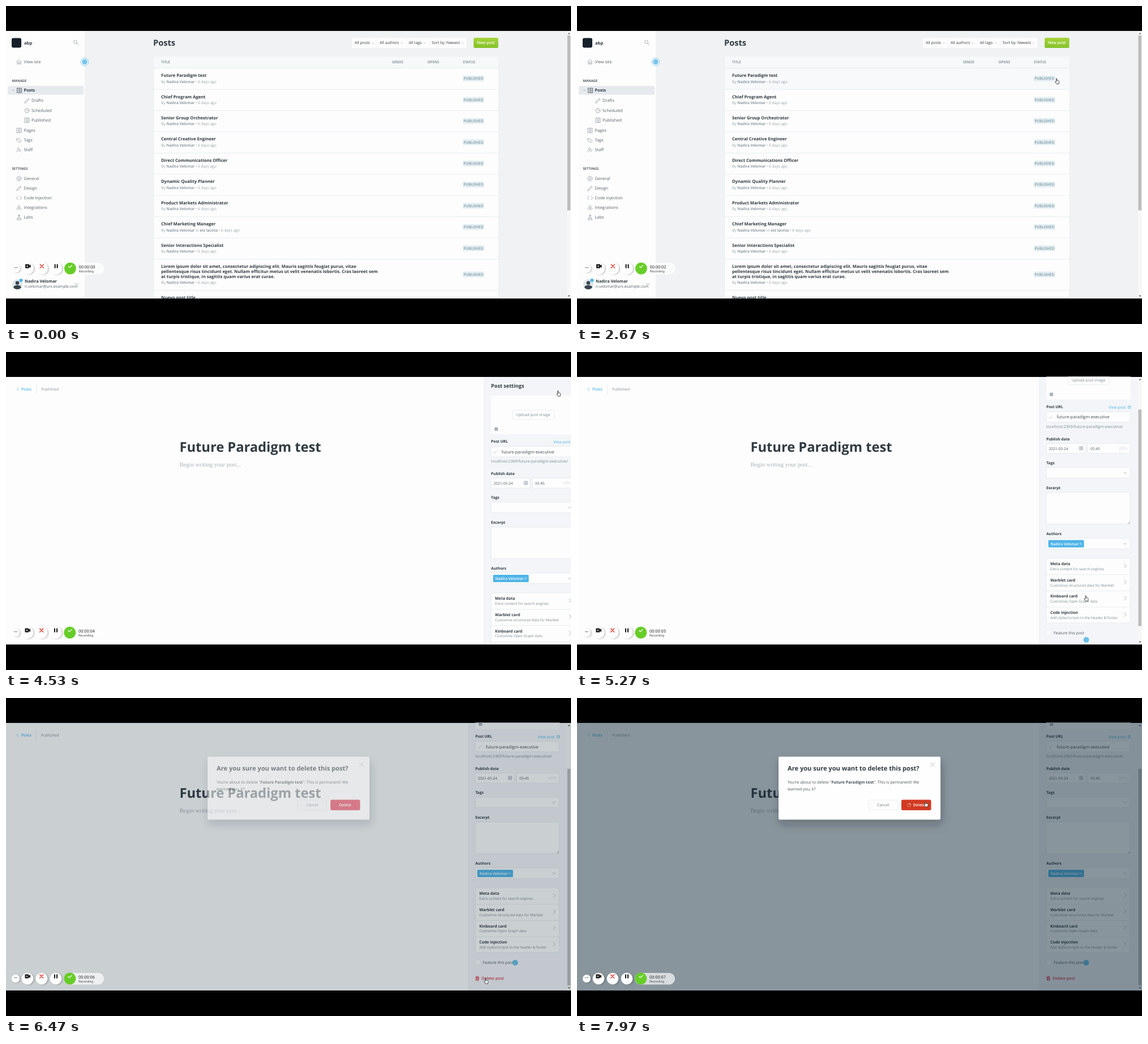
An HTML page that plays this animation: 998x561 px, repeating every 8 s.

```html
<!DOCTYPE html>
<html lang="en">
<head>
<meta charset="utf-8">
<title>Deleting a post</title>
<style>
  html, body { margin: 0; width: 100%; height: 100%; overflow: hidden; background: #000; }
  svg { display: block; width: 100vw; height: 100vh; font-family: "Open Sans", "Noto Sans", sans-serif; text-rendering: geometricPrecision; }
  text { white-space: pre; }
</style>
</head>
<body>
<svg id="stage" viewBox="0 0 998 561"></svg>
<script>
const LOOP = 8000;
const INK = '#303b42', TEXT = '#56636c', MUTED = '#94a2ab', LINE = '#dfe7ea', BLUE = '#4fb4e8';
const AUTHOR = 'Nadira Velomar', EMAIL = 'n.velomar@uni.example.com';

// ---------- drawing helpers: y is the vertical middle of a line of text ----------
const text = (x, y, str, size, fill = TEXT, weight = 400, more = '') =>
  `<text x="${x}" y="${y + size * .35}" font-size="${size}" fill="${fill}" font-weight="${weight}" ${more}>${str}</text>`;
const rect = (x, y, w, h, fill, more = '') =>
  `<rect x="${x}" y="${y}" width="${w}" height="${h}" fill="${fill}" ${more}/>`;
const box = (x, y, w, h, r = 2, fill = '#fdfdfd', stroke = LINE) =>
  rect(x, y, w, h, fill, `rx="${r}" stroke="${stroke}" stroke-width=".7"`);
const circle = (x, y, r, fill, more = '') => `<circle cx="${x}" cy="${y}" r="${r}" fill="${fill}" ${more}/>`;
const icon = (x, y, d, stroke = '#87949d', width = .75) =>
  `<path transform="translate(${x} ${y})" d="${d}" fill="none" stroke="${stroke}" stroke-width="${width}" stroke-linecap="round" stroke-linejoin="round"/>`;
const group = (id, body, more = '') => `<g id="${id}" ${more}>${body}</g>`;

const DOWN = 'M-2-1 0 1 2-1', RIGHT = 'M-1.7-3.5 1.7 0-1.7 3.5', CROSS = 'M-3-3 3 3M3-3-3 3';
const ROUND = 'M4 0A4 4 0 1 1-4 0A4 4 0 1 1 4 0';
const PAGE = 'M-3.5-4H4V4H-3.5ZM-1.5-2H2M-1.5 0H2M-1.5 2H2';

const scrollbar = thumb =>
  rect(991, 44, 7, 472, '#f7f7f7') + thumb +
  `<path d="M992.5 49.5 994.5 47 996.5 49.5ZM992.5 510.5 994.5 513 996.5 510.5Z" fill="#555"/>`;

// ---------- post list ----------
function sidebar() {
  const entries = [
    [98, 'View site', 'M-4 0 0-4 4 0M-3-1V4H-1V1H1V4H3V-1'],
    [219, 'Pages', PAGE],
    [236.5, 'Tags', 'M-4-3H0L4 1 1 4-4 0ZM-2-1.2V-1'],
    [253.5, 'Staff', 'M-1-4A1.8 1.8 0 1 1-1.1-4M-4 4C-4-1 2-1 2 3M1.5 2 4-1'],
    [304, 'General', ROUND + 'M1.5 0A1.5 1.5 0 1 1-1.5 0A1.5 1.5 0 1 1 1.5 0'],
    [321, 'Design', 'M-4 4-3 1 3-4 4-3-1 3Z'],
    [338, 'Code injection', 'M-2-3-4.5 0-2 3M2-3 4.5 0 2 3'],
    [355, 'Integrations', 'M0-4 2-2 0 0-2-2ZM-2 0 0 2-2 4-4 2ZM2 0 4 2 2 4 0 2Z'],
    [372.5, 'Labs', 'M-1.5-4H1.5M-1-4V-1L-4 4H4L1-1V-4M-2 1.5H2'],
  ];
  const nested = [
    [166.5, 'Drafts', 'M-4 4-3 1 3-4 4-3-1 3Z'],
    [184, 'Scheduled', ROUND + 'M0-2V0H2'],
    [201, 'Published', PAGE],
  ];
  return rect(0, 44, 139, 472, '#fdfdfd') +
    rect(10, 56.5, 17, 17, '#15212a', 'rx="3"') + text(32, 65, 'abp', 7.6, INK, 700) +
    icon(123, 64, 'M2.5-.5A3 3 0 1 1-3.5-.5A3 3 0 1 1 2.5-.5M1.8 1.8 4.5 4.5') +
    text(10.5, 131.5, 'MANAGE', 6, INK, 600) + text(10.5, 287, 'SETTINGS', 6, INK, 600) +
    rect(3, 141, 134, 15.5, '#e6eaee', 'rx="2"') + icon(13, 149, DOWN, MUTED) +
    icon(23.5, 149, PAGE, INK) + text(31.5, 148.5, 'Posts', 7.4, INK, 700) +
    entries.map(([y, label, d]) => icon(23, y + .5, d) + text(31.5, y, label, 7.4)).join('') +
    nested.map(([y, label, d]) => icon(37, y + .5, d) + text(45, y, label, 7.4)).join('') +
    circle(20, 491, 9, '#dfe5e9') + circle(20, 488.5, 3.2, '#35434c') +
    `<path d="M13 496.500C14 491 26 491 27 496.500A9 9 0 0 1 13 496.500Z" fill="#35434c"/>` +
    circle(26.500, 484, 3, BLUE) +
    text(33, 485, AUTHOR, 7.25, INK, 700) + text(33, 495, EMAIL, 6.9) + icon(125, 490.5, 'M-3-1.500 0 1.500 3-1.500');
}

function postList() {
  const titles = ['Future Paradigm test', 'Chief Program Agent', 'Senior Group Orchestrator',
    'Central Creative Engineer', 'Direct Communications Officer', 'Dynamic Quality Planner',
    'Product Markets Administrator', 'Chief Marketing Manager', 'Senior Interactions Specialist'];
  const lorem = ['Lorem ipsum dolor sit amet, consectetur adipiscing elit. Mauris sagittis feugiat purus, vitae',
    'pellentesque risus tincidunt eget. Nullam efficitur metus ut velit venenatis lobortis. Cras laoreet sem',
    'at turpis tristique, in sagittis quam varius erat curae.'];
  const filters = [[616, 'All posts', 648], [660, 'All authors', 699], [711.5, 'All tags', 740], [752, 'Sort by: Newest', 806.5]];
  const strong = s => `<tspan font-weight="600" fill="#768690">${s}</tspan>`;
  const byline = (y, tag = '') =>
    text(274, y, `By ${strong(AUTHOR)}${tag && ' in ' + strong(tag)} • 6 days ago`, 6.6, MUTED);
  const badge = y => rect(807, y - 5, 37.5, 10, '#e3eef2', 'rx="1.5"') +
    text(825.7, y, 'PUBLISHED', 6.4, '#7f96a2', 600, 'text-anchor="middle"');
  const divider = y => rect(261, y, 609, .8, '#dfecec');
  const title = (y, str) => text(274, y, str, 7.6, INK, 700);

  return rect(139, 44, 852, 472, '#f0f2f4') + sidebar() +
    text(260, 65, 'Posts', 14.6, INK, 700) +
    rect(611, 56.5, 202, 17.5, '#fdfdfd', 'rx="2"') +
    [655.5, 707, 747.5].map(x => rect(x, 57, .7, 17, '#eceff1')).join('') +
    filters.map(([x, label, arrow]) => text(x, 65, label, 6.85, INK) + icon(arrow, 65.5, 'M-1.500-.7 0 .7 1.500-.7', MUTED, .6)).join('') +
    rect(826, 56, 43.5, 18, 'url(#green)', 'rx="2.5"') +
    text(847.7, 65, 'New post', 6.9, '#fff', 600, 'text-anchor="middle"') +
    rect(261, 89, 609, 427, '#fdfdfd', 'stroke="#e8edef" stroke-width=".7"') + rect(261, 89, 609, 20.5, '#f6f8f9') +
    [[274, 'TITLE'], [682, 'SENDS'], [744.5, 'OPENS'], [807, 'STATUS']].map(([x, s]) => text(x, 99, s, 6.2, '#71808a', 600)).join('') +
    rect(261, 109.5, 609, 37.4, '#f7f9fb', 'id="hover"') + divider(109) +
    titles.map((name, i) => {
      const y = 37.42 * i;
      return title(122.5 + y, name) + byline(133.3 + y, i === 7 ? 'est lacinia' : '') + badge(128 + y) + divider(146.7 + y);
    }).join('') +
    lorem.map((line, i) => title(459.3 + i * 8.9, line)).join('') + byline(487.7) + badge(473.5) + divider(501) +
    title(514.5, 'Nuevo post title') +
    circle(139, 98.5, 6.8, '#fdfdfd', 'stroke="#84c9ec" stroke-width="1"') + circle(139, 98.5, 4.8, '#7ac6eb') +
    scrollbar(rect(991.5, 52, 5.5, 308.5, '#bcbcbc'));
}

// ---------- editor ----------
function settings() {
  const label = (y, s) => text(829, y, s, 6.7, INK, 700);
  const cards = [['Meta data', 'Extra content for search engines'], ['Warblet card', 'Customise structured data for Warblet'],
    ['Kinboard card', 'Customise Open Graph data'], ['Code injection', 'Add styles/scripts to the header &amp; footer']];
  const calendar = 'M-3-3H3V3H-3ZM-3-1H3M-3 1H3M-1-3V3M1-3V3';
  return text(829, 60, 'Post settings', 9.1, INK, 700) +
    rect(829, 77, 149, 68, '#fdfdfd', 'rx="2"') + box(867, 102.5, 73, 16.5) +
    text(903.5, 111, 'Upload post image', 6.8, '#7d8b94', 400, 'text-anchor="middle"') +
    rect(835, 133, 6, 6, '#a9b3b9') +
    label(158, 'Post URL') + text(939, 158.5, 'View post', 6.8, BLUE) + icon(975.5, 158.5, 'M0-2H-2V2H2V0M0 0 2-2M.5-2H2V-.5', BLUE) +
    box(829, 166.5, 148, 18.5) + icon(837.5, 176, 'M-2.5 2 2.500-2M-2.5 0V2H-.5', '#c6cfd4') +
    text(847.5, 176, 'future-paradigm-executive', 7.55, '#3f4c54') +
    text(829, 193, 'localhost:2369/future-paradigm-executive/', 6.85, '#7c8a92') +
    label(215, 'Publish date') + box(829, 222.5, 69, 17.5) + box(902, 222.5, 75, 17.5) +
    text(833.5, 231.5, '2021-05-24', 6.5, '#4c5961') + icon(890.5, 231, calendar, MUTED, .6) +
    text(907, 231.5, '05:45', 6.5, '#4c5961') + text(957.500, 231.5, '(UTC)', 5.6, '#c3ccd1') +
    label(257, 'Tags') + box(829, 265, 148, 18.5) + icon(968, 274.5, 'M-2.500-1.2 0 1.2 2.500-1.2', MUTED) +
    label(301, 'Excerpt') + box(829, 309, 148, 55.5) + icon(975, 362.5, 'M-2 1.500 1.500-2M0 1.500 1.500 0', '#777', .6) +
    label(382, 'Authors') + box(829, 390, 148, 18.5) + rect(832.5, 393, 63, 13, BLUE, 'rx="1.500"') +
    text(836.5, 399.5, AUTHOR, 6.6, '#fff', 600) + icon(889.7, 399.5, 'M-1.700-1.700 1.700 1.700M1.700-1.700-1.700 1.700', '#dff1fb') +
    icon(968, 399.5, 'M-2.500-1.2 0 1.2 2.500-1.2', MUTED) +
    box(829, 425, 148, 114) +
    cards.map(([name, about], i) => {
      const y = 28.6 * i;
      return (i ? rect(829, 425 + y, 148, .7, LINE) : '') + text(836, 435 + y, name, 6.9, INK, 700) +
        text(836, 444 + y, about, 6.3, '#7c8a92') + icon(968.5, 438.5 + y, RIGHT, MUTED);
    }).join('') +
    box(829, 552, 9, 9) + text(842, 557, 'Feature this post', 6.9, '#4c5961') +
    icon(832.5, 584.5, 'M-3-2H3M-1-3.300H1M-2.300-2V3.500H2.300V-2M-.8-.5V2M.8-.5V2', '#d8364b', 1) +
    text(840, 584.5, 'Delete post', 7.2, '#d8364b', 600);
}

function editor() {
  return rect(0, 44, 998, 472, '#fdfdfd') +
    icon(20.500, 65.5, 'M1.200-2.500-1.200 0 1.200 2.500', BLUE) + text(27, 65.5, 'Posts', 6.9, BLUE, 600) +
    rect(53, 56, .7, 20, LINE) + text(62, 65.5, 'Published', 6.75, '#84929b') +
    text(306.5, 167.5, 'Future Paradigm test', 23.7, INK, 700) +
    text(306.5, 198.5, 'Begin writing your post...', 10.6, '#a7b2b9', 400, 'font-family="Liberation Serif, serif"') +
    group('panel', rect(817, 44, 181, 472, '#f3f5f8') + rect(816.5, 44, .7, 472, '#e6ebee') +
      group('settings', settings()) + circle(899.5, 0, 5, '#6cc0e8', 'id="dot"') +
      scrollbar(rect(991.5, 52, 5.5, 382, '#bcbcbc', 'id="thumb"')));
}

function modal() {
  return rect(356, 103.5, 286, 111, '#fefefe', 'rx="2.500" filter="url(#shadow)"') +
    text(372, 124.5, 'Are you sure you want to delete this post?', 11.1, INK, 700) +
    icon(628, 117.5, 'M-4-4 4 4M4-4-4 4', '#9fabb2', .7) +
    text(372, 149, 'You\'re about to delete "<tspan font-weight="700">Future Paradigm test</tspan>". This is permanent! We', 7.1, '#48555d') +
    text(372, 161, 'warned you, k?', 7.1, '#48555d') +
    box(515, 180, 51.5, 18, 2.5) + text(540.7, 189, 'Cancel', 6.8, '#6d7b84', 400, 'text-anchor="middle"') +
    rect(573, 179.500, 52.5, 18.5, '#e0314a', 'rx="2.500" id="delete"') +
    text(599, 189, 'Delete', 6.8, '#fff', 600, 'text-anchor="middle" id="deleteLabel"') +
    group('spinner', circle(0, 0, 2.8, 'none', 'stroke="#fff" stroke-opacity=".45" stroke-width=".8"') +
      `<path d="M0-2.8A2.8 2.8 0 0 1 2.800 0" fill="none" stroke="#fff" stroke-width=".8"/>`);
}

// ---------- recorder and pointer ----------
function recorder() {
  return rect(102, 485, 71, 20.500, '#fff', 'rx="10" fill-opacity=".68"') +
    [[17, 7], [38, 10.3], [63, 10.3], [88, 10.3]].map(([x, r]) => circle(x, 495, r, '#fff', 'filter="url(#soft)"')).join('') +
    circle(112.800, 495, 10.5, '#67cd28') +
    [14.8, 17, 19.2].map(x => circle(x, 493.500, .75, '#44505a')).join('') +
    `<path d="M33.500 487.500H40.300V490L43 488V494L40.300 492V494.500H33.500Z" fill="#111"/><path d="M35.200 491H38.700M37 489.300V492.700" stroke="#fff" stroke-width=".8"/>` +
    icon(62.700, 491, CROSS, '#e02b20', 1.4) + rect(85, 487.500, 2, 7, '#111') + rect(89, 487.500, 2, 7, '#111') +
    icon(112.800, 491.500, 'M-3 0-1 2 3.300-2', '#fff', 1.1) +
    text(128, 492, '', 7.5, '#333', 400, 'id="clock" font-family="Roboto, sans-serif"') +
    text(128, 499.800, 'Recording', 5.8, '#555', 400, 'font-family="Roboto, sans-serif"');
}

const HAND = 'M-1.500-4.500C-1.500-5.500-.2-5.500-.2-4.500V-1.500L2.800-.9C3.600-.7 3.700 0 3.600.8L3 4.500H-1L-3.300 1C-3.600.2-2.500-.3-1.500.8Z';

document.getElementById('stage').innerHTML = `
  <defs>
    <linearGradient id="green" x2="0" y2="1"><stop stop-color="#a5d43a"/><stop offset="1" stop-color="#85c22a"/></linearGradient>
    <filter id="shadow" x="-20%" y="-20%" width="140%" height="170%"><feDropShadow dy="8" stdDeviation="8" flood-color="#14242e" flood-opacity=".3"/></filter>
    <filter id="soft" x="-30%" y="-30%" width="160%" height="170%"><feDropShadow dy=".8" stdDeviation="1" flood-opacity=".22"/></filter>
    <clipPath id="screen"><rect y="43.500" width="998" height="472.500"/></clipPath>
  </defs>
  ${rect(0, 0, 998, 561, '#000')}
  <g clip-path="url(#screen)">
    ${group('list', postList())}
    ${group('editor', editor())}
    ${rect(0, 43, 998, 473, '#122a38', 'id="shade"')}
    ${group('modal', modal())}
    ${group('recorder', recorder())}
    ${group('pointer', `<path d="${HAND}" fill="#fff" stroke="#222" stroke-width=".8" stroke-linejoin="round"/>`)}
  </g>`;

// ---------- motion ----------
const el = Object.fromEntries([...document.querySelectorAll('#stage [id]')].map(node => [node.id, node]));
const set = (id, name, value) => el[id].setAttribute(name, value);
const show = (id, on) => set(id, 'visibility', on ? 'visible' : 'hidden');
const move = (id, x, y) => set(id, 'transform', `translate(${x} ${y})`);
const progress = (t, start, length) => Math.min(1, Math.max(0, (t - start) / length));
const easeOut = (p, power) => 1 - (1 - p) ** power;
const smooth = p => p * p * (3 - 2 * p);

const OPEN_EDITOR = 3130, CONFIRM = 7600;
// Pointer stops: arrival begins, arrival ends, x, y
const STOPS = [[2400, 2400, 862, 70], [2400, 2640, 848, 133], [3450, 4180, 976, 73.5],
  [4620, 5060, 899.5, 435], [5650, 6200, 848, 499.5], [6720, 7400, 616.5, 187.5]];

function pointerAt(t) {
  let [, , x, y] = STOPS[0];
  for (const [from, to, toX, toY] of STOPS.slice(1)) {
    const p = smooth(progress(t, from, to - from));
    x += (toX - x) * p;
    y += (toY - y) * p;
  }
  return [x, y];
}

function draw(t) {
  const editing = t >= OPEN_EDITOR, confirming = t >= CONFIRM;
  set('list', 'display', editing ? 'none' : 'inline');
  set('editor', 'display', editing ? 'inline' : 'none');
  show('hover', t >= 2570);

  move('panel', 181 * (1 - easeOut(progress(t, 4350, 390), 3)), 0);
  const scroll = 90 * easeOut(progress(t, 5080, 440), 2);
  move('settings', 0, -scroll);
  set('dot', 'cy', 508 - (scroll - 61) * 41 / 29);
  set('thumb', 'y', 52 + scroll * .81);

  const fade = progress(t, 6370, 225);
  set('shade', 'opacity', .49 * fade);
  set('modal', 'opacity', easeOut(fade, 1.3));
  set('delete', 'fill', confirming ? '#d23a22' : '#e0314a');
  set('deleteLabel', 'x', confirming ? 604.5 : 599);
  show('spinner', confirming);
  set('spinner', 'transform', `translate(586.500 189) rotate(${t * .36})`);

  move('recorder', editing ? 0 : .6, editing ? 0 : -32);
  el.clock.textContent = '00:00:0' + Math.max(0, Math.floor((t - 100) / 1000));
  show('pointer', t >= 2400);
  move('pointer', ...pointerAt(t));
}

const start = performance.now();
function tick() {
  draw((performance.now() - start) % LOOP);
  requestAnimationFrame(tick);
}
tick();
</script>
</body>
</html>
```
